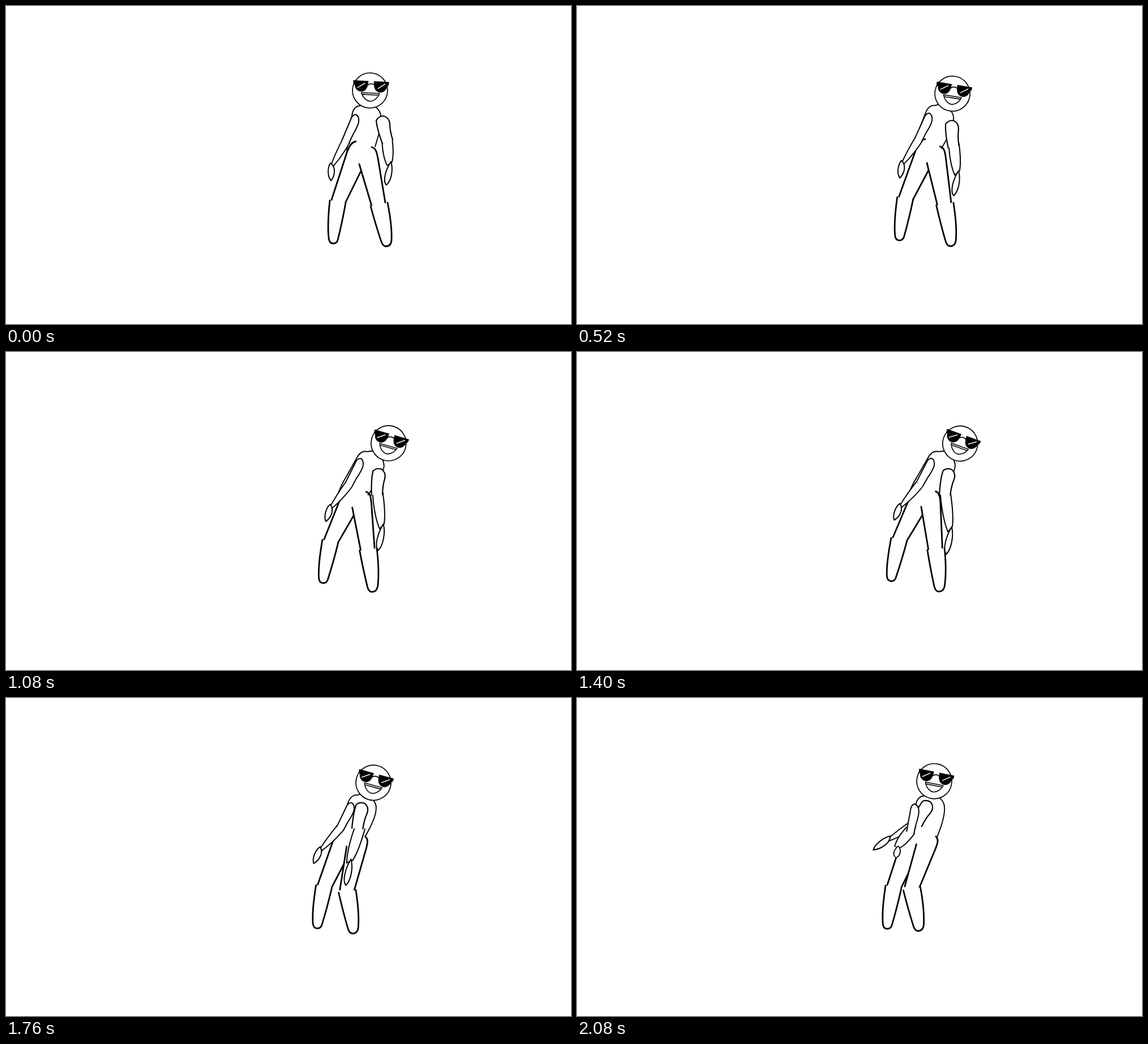
Write an HTML page that moves like this. It is 998 by 561 pixels and loops after 2120 ms.

```html
<!DOCTYPE html>
<html lang="en">
<head>
<meta charset="utf-8">
<title>Swinging figure</title>
<style>
html, body { margin: 0; width: 100%; height: 100%; overflow: hidden; background: #fff; }
svg { display: block; width: 998px; height: 561px; }
path, circle { stroke: #000; stroke-linecap: round; stroke-linejoin: round; }
</style>
</head>
<body>
<svg id="stage" viewBox="0 0 998 561"></svg>
<script>
const LOOP = 2120, STEP = 40, TURNING = 1400, END = 2080;
const stage = document.getElementById('stage');

const line = (d, width, fill = '#fff') => `<path d="${d}" stroke-width="${width}" fill="${fill}"/>`;
const patch = d => `<path d="${d}" fill="#fff" style="stroke:none"/>`;

function part(art) {
  const node = document.createElementNS('http://www.w3.org/2000/svg', 'g');
  node.innerHTML = art;
  return stage.appendChild(node);
}

// Parts are stacked in the order of creation; each is drawn around its own joint.
const torso = part(patch('M-60 72L-57 38-51 0-37-18-20-24-9-16 0 0-4 34-10 54z') +
  line('M-60 72Q-60 52-57 38L-51 0Q-49-17-37-18Q-30-23-20-24M-9-16Q0-8 0 0Q2 10-4 34L-10 54', 1.9, 'none'));

const leftThigh = part(patch('M43-103L26-80 0 0 25 4 55-57z') +
  line('M43-103C34-102 29-90 26-80L0 0M25 4L55-57', 2.8, 'none'));
const leftShin = part(line('M0 0C-3 28-4 48-2 66Q-1 76 6 76Q12 76 14 70C18 54 23 32 28 4', 2.8));

const rightThigh = part(patch('M0 0L22 74 46 68 33-10 22-30z') +
  line('M0 0L22 74M22-30C30-28 31-20 33-10L46 68', 2.8, 'none'));
const rightShin = part(line('M-15 3C-9 25-3 45 3 63Q6 74 12 74Q21 74 22 63Q23 37 15-3', 2.8));

const leftForearm = part(line('M-7-50Q-6-20-3 0L1 4Q7-22 7-50', 1.9));
const leftHand = part(line('M-4-4C-9 3-10 19-3 27C3 20 4 10 2 4Q0-1-4-4z', 2));
const rightForearm = part(line('M-9-66Q-11-24-4 3L5-5Q10-24 9-66', 2));
const rightUpper = part(line('M-1 37Q-11 10-12-4Q-8-12 1-12Q11-9 12 2Q12 14 17 30', 2.2));
const leftUpper = part(line('M-23 44C-17 30-12 18-7 6Q-4 0 1 0Q7 3 6 13Q4 22-4 35L-11 50', 2));
const rightHand = part(line('M2-5C9 8 9 28 2 37C-6 32-5 12 2-5z', 2));

const lens = '<path d="M-30-16H-4L-5-8C-7 6-25 6-27-9L-29.5-11z" stroke-width="1"/>';
const head = part('<circle r="31" fill="#fff" stroke-width="1.7"/>' + lens +
  `<g transform="translate(2.4) scale(-1 1)">${lens}</g>` +
  line('M-5-9Q2-15 9-9', 1.7, 'none') +
  '<path d="M-22-4L-10-12.5M14-4L26-12.5" style="stroke:#fff" stroke-width="1.5"/>' +
  line('M-15 4.5H17C14 14 6 19 1 19S-12 14-15 4.5zM-13 7.5H15', 1.6));

// Point at (dx, dy) from a joint in a frame turned clockwise.
function from([x, y], dx, dy, degrees = 0) {
  const a = degrees * Math.PI / 180, c = Math.cos(a), s = Math.sin(a);
  return [x + dx * c - dy * s, y + dx * s + dy * c];
}

function place(node, [x, y], degrees, size = 1) {
  node.setAttribute('transform', `translate(${x} ${y}) rotate(${degrees}) scale(1 ${size})`);
}

function pose(t) {
  // First the figure leans to the right, then it swings back to the left.
  const lean = Math.min(t / TURNING, 1);
  const bend = Math.sin(Math.min(t, TURNING) / 830);
  const swing = Math.max(0, (t - TURNING) / (END - TURNING));
  const settle = Math.sin(swing * Math.PI / 2);
  const late = swing ** 4;

  const leftKnee = [575 - 17 * lean - 10 * settle, 342 - 15 * lean + 3 * settle];
  place(leftThigh, leftKnee, 5 * lean - 5 * settle);
  place(leftShin, from(leftKnee, -3, 1), 5 * lean - 2.5 * settle);

  const hip = [624 - 16 * lean - 8.5 * settle, 279 - 6 * lean - 15 * settle];
  const thighTurn = 7 * lean + 25 * settle;
  place(rightThigh, hip, thighTurn);
  place(rightShin, from(hip, 35, 71, thighTurn), 6 * lean - 5 * settle);

  const chest = [662 + 5 * bend - 18 * settle, 194 + 12 * bend - 13 * settle];
  const chestTurn = 21 * bend - 17.5 * swing;
  place(torso, chest, chestTurn);
  place(head, from(chest, -19 + 12.5 * bend - 14 * swing, -45, chestTurn), 2.8 + 17 * lean - 8.5 * swing);

  const leftShoulder = from(chest, -45 - 9 * late, -2.5, chestTurn);
  const leftWrist = from(leftShoulder, 0, 98 + 2 * lean - 24 * late, 24 + 8 * lean + 2.5 * late);
  place(leftUpper, leftShoulder, 4.5 * lean - 17 * late);
  place(leftForearm, leftWrist, 28.7 + 10.8 * lean + 17.5 * late);
  place(leftHand, leftWrist, 21 * lean + 32 * late, 1 + .25 * late);

  const rightShoulder = from(chest, 4 - 10 * lean - 26 * settle, 12 + 3 * lean - 13 * settle, chestTurn);
  const rightWrist = from(rightShoulder, 0, 74 + 22 * lean - 9 * late, -8.6 + 7 * lean + 38 * swing ** 1.5);
  place(rightUpper, rightShoulder, 24 * lean + 19 * late);
  place(rightForearm, rightWrist, -5 - 2 * lean + 46 * swing, .67 + .33 * lean - .42 * late);
  place(rightHand, rightWrist, 11, 1 + .17 * lean - .67 * late);
}

function draw() {
  pose(Math.floor(performance.now() % LOOP / STEP) * STEP);
  requestAnimationFrame(draw);
}
draw();
</script>
</body>
</html>
```
